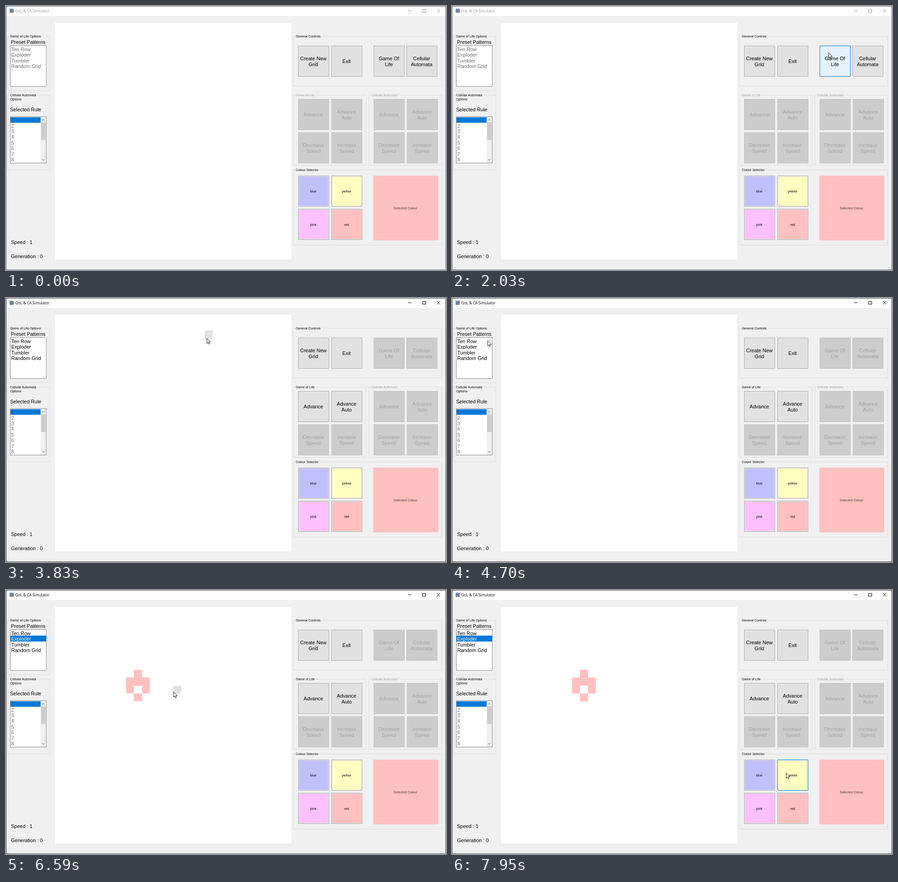
Recreate the animation shown at these times as an HTML page with a canvas. Size 967 by 579 pixels, loop 8000 ms.

```html
<!DOCTYPE html>
<html lang="en">
<head>
<meta charset="utf-8">
<title>GoL &amp; CA Simulator</title>
<style>
html, body { margin: 0; width: 100%; height: 100%; overflow: hidden; background: #f0f0f0; }
canvas { display: block; }
</style>
</head>
<body>
<canvas id="stage" width="967" height="579"></canvas>
<script>
const g = document.getElementById('stage').getContext('2d');
const LOOP = 8000, CELL = 17.3, GRID_X = 108.2, GRID_Y = 36.7, ROW = 12.45;
const SANS = '"Liberation Sans", Arial, sans-serif', UI = '"Open Sans", "Noto Sans", sans-serif';
const RED = '#ffc0c0', GREY = '#a0a0a0', BLUE = '#0078d7';
const PRESETS = ['Ten Row', 'Exploder', 'Tumbler', 'Random Grid'];
const PATTERN = ['.#.', '###', '#.#', '.#.'];

// Pointer legs: first step, last step, number of steps, end point
const START = [928, 598];
const LEGS = [
  [460, 740, 5, 783, 283],
  [1070, 1140, 2, 696, 132],
  [1210, 1760, 8, 826, 100],
  [1960, 2030, 2, 827, 102],
  [3550, 3830, 5, 441, 88],
  [4160, 4370, 4, 79, 92],
  [4700, 5120, 7, 57, 104],
  [6240, 6590, 6, 368, 223],
  [6920, 7270, 6, 612, 353],
  [7600, 7950, 6, 734, 401]
];

function pointerAt(t) {
  if (t < LEGS[0][0]) return null;
  let [x, y] = START;
  for (const [t0, t1, n, tx, ty] of LEGS) {
    if (t < t0) break;
    const step = Math.min(n, Math.floor((t - t0) / (t1 - t0) * (n - 1) + 1e-6) + 1);
    const k = step / n, e = k * k * (3 - 2 * k);
    x += (tx - x) * e;
    y += (ty - y) * e;
  }
  return { x: Math.round(x), y: Math.round(y) };
}

function fill(color, x, y, w, h) {
  g.fillStyle = color;
  g.fillRect(x, y, w, h);
}

function frame(color, x, y, w, h) {
  g.strokeStyle = color;
  g.strokeRect(x + .5, y + .5, w - 1, h - 1);
}

function line(color, ...p) {
  g.strokeStyle = color;
  g.beginPath();
  for (let i = 0; i < p.length; i += 2) g.lineTo(p[i], p[i + 1]);
  g.stroke();
}

// y is the middle of the capitals
function text(s, x, y, size = 11, color = '#000', align = 'left', font = SANS) {
  g.font = size + 'px ' + font;
  g.textAlign = align;
  g.fillStyle = color;
  g.fillText(s, x, y + size * .36);
}

function group(label, x, y, w, h, color = '#000') {
  frame('#dcdcdc', x, y, w, h);
  g.font = '7.2px ' + SANS;
  label.split('\n').forEach((s, i) => {
    if (!i) fill('#f0f0f0', x + 5, y - 1, g.measureText(s).width + 2, 3);
    text(s, x + 6, y + .5 + i * 9, 7.2, color);
  });
}

const inside = (p, x, y, w, h) => p && p.x >= x && p.x < x + w && p.y >= y && p.y < y + h;

function button(label, x, y, p, on = true, down = false) {
  const hot = on && inside(p, x, y, 68, 68);
  fill(!on ? '#cccccc' : down ? '#cce4f7' : hot ? '#e5f1fb' : '#e1e1e1', x, y, 68, 68);
  frame(!on ? '#bfbfbf' : down ? '#005499' : hot ? BLUE : '#adadad', x, y, 68, 68);
  const rows = label.split('\n');
  rows.forEach((s, i) =>
    text(s, x + 33.5, y + 34.5 + (i - (rows.length - 1) / 2) * 12.5, 11, on ? '#000' : GREY, 'center'));
}

function swatch(label, color, x, y, p) {
  const hot = inside(p, x, y, 68, 68);
  fill(hot ? '#e5f1fb' : '#e1e1e1', x, y, 68, 68);
  fill(color, x + 2, y + 2, 64, 64);
  frame(hot ? BLUE : '#adadad', x, y, 68, 68);
  text(label, x + 33.5, y + 34.5, 7.3, '#000', 'center');
}

function cell(color, c, r) {
  const x = Math.round(GRID_X + c * CELL), y = Math.round(GRID_Y + r * CELL);
  fill(color, x, y, Math.round(GRID_X + (c + 1) * CELL) - x, Math.round(GRID_Y + (r + 1) * CELL) - y);
}

function titleBar(active) {
  const ink = active ? '#000' : '#999';
  fill('#fff', 0, 0, 967, 22);
  fill('#6f86a8', 8, 6, 9, 9);
  text('GoL & CA Simulator', 20.5, 11, 8.2, ink, 'left', UI);
  line(ink, 884, 10.5, 891, 10.5);
  frame(ink, 915, 7, 8, 7);
  line(ink, 947, 7, 954, 14);
  line(ink, 954, 7, 947, 14);
}

function sidePanel(enabled, picked) {
  const dim = '#6d6d6d';
  group('Game of Life Options', 3, 66, 94, 120);
  text('Preset Patterns', 11, 79);
  fill('#fff', 9, 86, 80, 91);
  frame('#828790', 9, 86, 80, 91);
  PRESETS.forEach((s, i) => {
    const chosen = picked && i === 1;
    if (chosen) fill(BLUE, 10, 100, 78, 13);
    text(s, 11.5, 94.8 + i * ROW, 11, chosen ? '#fff' : enabled ? '#000' : dim);
  });

  group('Cellular Automata\nOptions', 3, 195, 94, 165);
  text('Selected Rule', 9, 227.5);
  fill('#fff', 9, 242, 80, 103);
  frame('#828790', 9, 242, 80, 103);
  fill(BLUE, 10, 244, 66, 12);
  for (let i = 0; i < 8; i++) text(i + 1, 11.5, 250.1 + i * ROW, 11, i ? dim : '#2c65a0');
  fill('#f0f0f0', 76, 243, 12, 101);
  fill('#cdcdcd', 77, 255, 10, 39);
  line('#404040', 79.5, 251, 82, 248.5, 84.5, 251);
  line('#404040', 79.5, 336, 82, 338.5, 84.5, 336);

  text('Speed : 1', 11, 518.5);
  text('Generation : 0', 11, 549.5);
}

function controls(p, started, down) {
  group('General Controls', 631, 66, 327, 110);
  button('Create New\nGrid', 642, 87, p);
  button('Exit', 715, 87, p);
  button('Game Of\nLife', 808, 87, p, !started, down);
  button('Cellular\nAutomata', 880, 87, p, !started);

  group('Game of Life', 631, 195, 161, 155, started ? '#000' : GREY);
  group('Cellular Automata', 797, 195, 161, 155, GREY);
  for (const [x, on] of [[642, started], [808, false]]) {
    button('Advance', x, 204, p, on);
    button('Advance\nAuto', x + 73, 204, p, on);
    button('Decrease\nSpeed', x, 277, p, false);
    button('Increase\nSpeed', x + 73, 277, p, false);
  }

  group('Colour Selector', 631, 359, 327, 166);
  swatch('blue', '#c0c0ff', 642, 372, p);
  swatch('yellow', '#ffffc0', 715, 372, p);
  swatch('pink', '#ffc0ff', 642, 445, p);
  swatch('red', RED, 715, 445, p);
  fill(RED, 807, 372, 143, 142);
  text('Selected Colour', 878, 443, 7.3, '#503c3c', 'center');
}

function grid(p, seeded) {
  fill('#fff', 108, 37, 519, 519);
  if (seeded) PATTERN.forEach((row, r) =>
    [...row].forEach((ch, c) => { if (ch === '#') cell(RED, 9 + c, 8 + r); }));
  if (inside(p, GRID_X, GRID_Y, 519, 519))
    cell('#e1e1e1', Math.floor((p.x - GRID_X) / CELL), Math.floor((p.y - GRID_Y) / CELL));
}

function pointer(p, clicking) {
  if (clicking) {
    g.fillStyle = 'rgba(205,205,20,.75)';
    g.beginPath();
    g.arc(p.x + 1, p.y, 8.5, 0, 7);
    g.fill();
  }
  g.save();
  g.translate(p.x + .5, p.y + .5);
  g.scale(.72, .72);
  const arrow = new Path2D('M0 0V16L3.7 12.5L6.2 18L8.6 17L6.2 11.5H11.3Z');
  g.fillStyle = '#fff';
  g.fill(arrow);
  g.strokeStyle = '#000';
  g.lineWidth = 1.2;
  g.stroke(arrow);
  g.restore();
}

function draw(t) {
  const p = pointerAt(t);
  const between = (a, b) => t >= a && t < b;
  const active = t >= 2490, started = t >= 2560;
  g.lineWidth = 1;
  fill('#f0f0f0', 0, 0, 967, 579);
  titleBar(active);
  sidePanel(started, t >= 5520);
  controls(p, started, between(2490, 2560));
  grid(p, t >= 5650);
  frame(active ? '#3c3c4c' : '#66668a', 0, 0, 967, 579);
  if (p) pointer(p, between(2490, 2630) || between(5520, 5780));
}

const begin = performance.now();
function tick() {
  draw((performance.now() - begin) % LOOP);
  requestAnimationFrame(tick);
}
tick();
</script>
</body>
</html>
```
